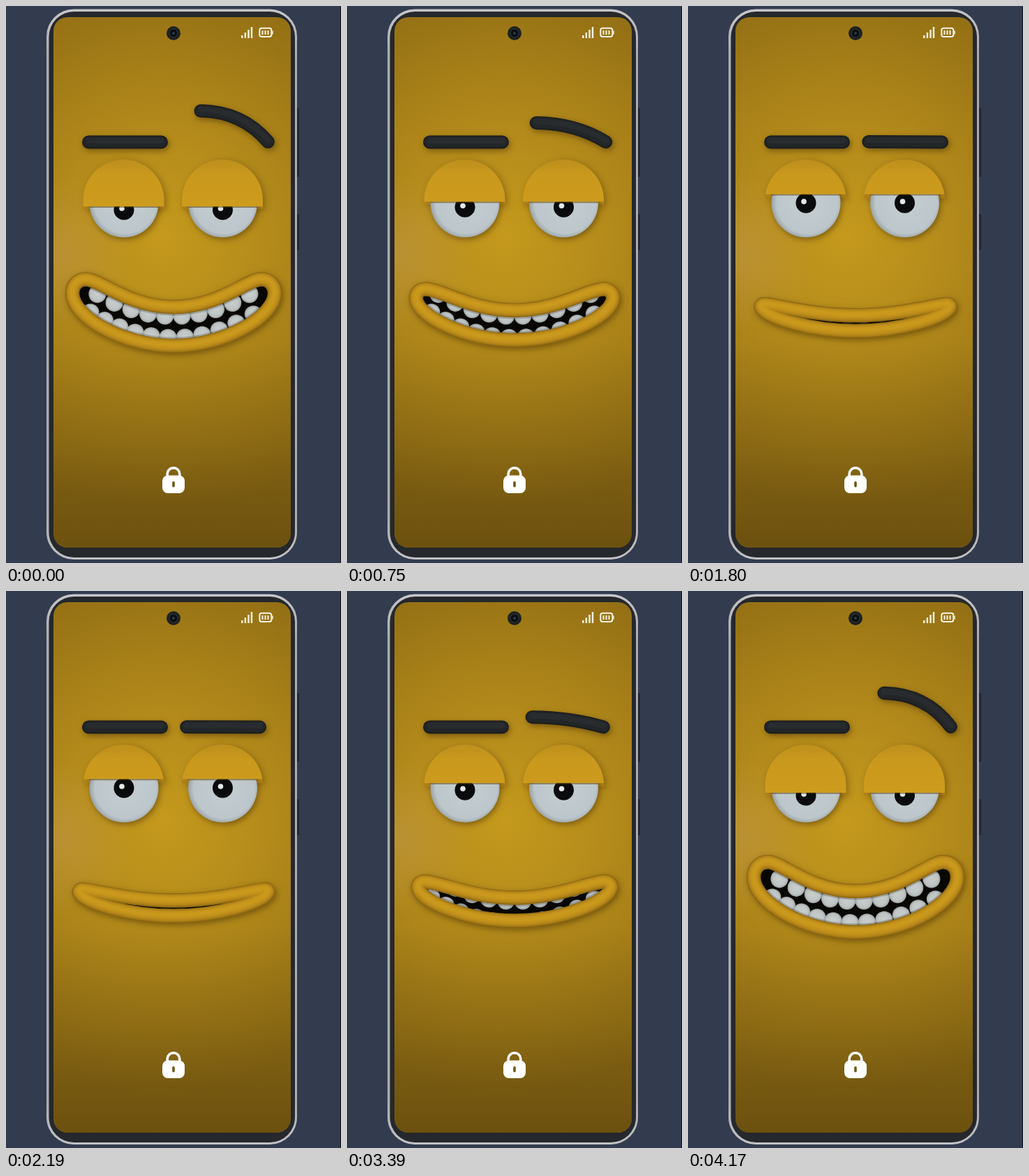
Write an HTML page that moves like this. It is 480 px wide and 798 px high and loops after 4.2 s.

```html
<!DOCTYPE html>
<html lang="en">
<head>
<meta charset="utf-8">
<title>Smirking lock screen</title>
<style>
html, body { margin: 0; width: 100%; height: 100%; overflow: hidden; background: #333b4f; }
svg { display: block; width: 100vw; height: 100vh; }
.cast { filter: drop-shadow(2px 3px 4px rgba(62, 40, 0, .5)); }
.soft { filter: drop-shadow(3px 2px 5px rgba(72, 46, 0, .4)); }
.tube { fill: none; stroke-linecap: round; stroke-linejoin: round; }
</style>
</head>
<body>
<svg viewBox="0 0 480 798">
  <defs>
    <linearGradient id="metal" x2="0" y2="1">
      <stop offset="0" stop-color="#c6c6c9"/>
      <stop offset=".08" stop-color="#ababaf"/>
      <stop offset=".92" stop-color="#ababaf"/>
      <stop offset="1" stop-color="#c2c2c5"/>
    </linearGradient>
    <radialGradient id="wall" gradientUnits="userSpaceOnUse" cx="225" cy="330" r="390">
      <stop offset="0" stop-color="#c4991c"/>
      <stop offset=".3" stop-color="#b88e1c"/>
      <stop offset=".6" stop-color="#a78018"/>
      <stop offset="1" stop-color="#8e6b14"/>
    </radialGradient>
    <radialGradient id="glow" gradientUnits="userSpaceOnUse" cx="72" cy="355" r="110">
      <stop offset="0" stop-color="#c29a50" stop-opacity=".45"/>
      <stop offset="1" stop-color="#c29a50" stop-opacity="0"/>
    </radialGradient>
    <linearGradient id="dusk" gradientUnits="userSpaceOnUse" x1="0" y1="480" x2="0" y2="776">
      <stop offset="0" stop-color="#4a370a" stop-opacity="0"/>
      <stop offset=".5" stop-color="#4a370a" stop-opacity=".18"/>
      <stop offset="1" stop-color="#4a370a" stop-opacity=".5"/>
    </linearGradient>
    <linearGradient id="lid" gradientUnits="userSpaceOnUse" x1="0" y1="220" x2="0" y2="292">
      <stop offset="0" stop-color="#bd8f1c"/>
      <stop offset=".3" stop-color="#c9991d"/>
      <stop offset="1" stop-color="#ce9c1d"/>
    </linearGradient>
    <radialGradient id="ball" cx=".52" cy=".5" r=".52">
      <stop offset="0" stop-color="#c4cdd1"/>
      <stop offset=".85" stop-color="#bdc7cb"/>
      <stop offset="1" stop-color="#9aa2a4"/>
    </radialGradient>
    <radialGradient id="tooth" cx=".5" cy=".5" r=".5">
      <stop offset="0" stop-color="#c9cecd"/>
      <stop offset=".75" stop-color="#bec4c4"/>
      <stop offset="1" stop-color="#9da3a2"/>
    </radialGradient>
    <path id="lips"/>
    <path id="arch"/>
    <clipPath id="hole"><use href="#lips"/></clipPath>
  </defs>

  <rect width="480" height="798" fill="#333b4f"/>
  <rect x="479" width="1" height="798" fill="#10131b"/>
  <rect x="414" y="146" width="6" height="99" rx="2" fill="#22262f"/>
  <rect x="414" y="298" width="6" height="52" rx="2" fill="#22262f"/>
  <rect x="58" y="4.500" width="359" height="788.500" rx="39" fill="url(#metal)"/>
  <rect x="61.500" y="8" width="352.500" height="782" rx="36" fill="#25282c"/>
  <g id="screen"></g>

  <circle cx="240" cy="39" r="10" fill="#1d2122"/>
  <circle cx="240" cy="39" r="6" fill="#0b0f11" stroke="#33383a"/>
  <circle cx="240" cy="39" r="2" fill="#2b3c49"/>

  <g stroke="#f8f3e2" stroke-width="2.400" fill="none">
    <path d="M338.300 46v-4M342.900 46v-8M347.500 46v-12M352 46v-16"/>
    <rect x="363.300" y="31.800" width="17" height="12.200" rx="3" stroke-width="2"/>
    <path d="M367.500 35v6M371.500 35v6M375.500 35v6" stroke-width="2"/>
    <path d="M382 35.500v5" stroke-width="1.500"/>
  </g>

  <g id="face"></g>

  <path d="M231.200 675v-4.500a8.800 8.800 0 0 1 17.600 0v4.500" fill="none" stroke="#fff" stroke-width="3.600"/>
  <rect x="224" y="672.500" width="32" height="25.500" rx="8" fill="#fff"/>
  <rect x="238.200" y="681" width="3.600" height="8.500" rx="1.800" fill="#72560f"/>
</svg>
<script>
const LOOP = 4200, EYES = [168.500, 310];
const byId = id => document.getElementById(id);
const mix = (a, b, k) => a + (b - a) * k;
const clamp = v => Math.max(0, Math.min(1, v));

// A rounded tube: stacked strokes, each [width, colour, vertical shift]
const tube = (ref, layers) => layers.map(([w, c, dy]) =>
  `<use href="#${ref}" class="tube" stroke="${c}" stroke-width="${w}" y="${dy}"/>`).join('');

const browLayers = [[19, '#1d1f20', 0], [15, '#232628', -.5], [8, '#292c2f', -2]];
const lipLayers = [[20.500, '#8d6612', 0], [18, '#a67b16', -.3], [15, '#b78819', -.7], [11, '#c2921b', -1], [6, '#c9991d', -1.500]];

function tooth(x, y, rx, ry) {
  return `<ellipse cx="${x}" cy="${y}" rx="${rx}" ry="${ry}" fill="url(#tooth)"/>`;
}

function teeth() {
  let s = '';
  for (let i = -5; i <= 5; i++) {
    const x = 232 + 24.500 * i + (i < 0 ? .45 * i * i : 0);
    s += tooth(x, 475 - 34 * ((x - 240) / 115) ** 2, 12.600, 12);
  }
  for (let i = 0; i < 10; i++) {
    const x = 131 + 24.200 * i;
    s += tooth(x, 444 - 31 * ((x - 240) / 108) ** 2, 12.600, 13);
  }
  return s;
}

const eye = (cx, i) => `
  <g class="soft"><path id="back${i}" fill="#b08118"/></g>
  <g class="cast"><circle cx="${cx + .5}" cy="282" r="49.500" fill="url(#ball)"/></g>
  <g id="pupil${i}">
    <circle cx="${cx + .5}" r="14.500" fill="#0a0b0c"/>
    <circle cx="${cx - 2.500}" cy="-2" r="3.800" fill="#e4e8e9"/>
  </g>
  <path id="shade${i}" fill="none" stroke="#4a3508" stroke-opacity=".5" stroke-width="2.500"/>
  <path id="lid${i}" fill="url(#lid)"/>`;

byId('screen').innerHTML = ['wall', 'glow', 'dusk'].map(fill =>
  `<rect x="68" y="16" width="340" height="760" rx="20" fill="url(#${fill})"/>`).join('');

byId('face').innerHTML = `
  <defs><path id="flat" d="M118.500 195H222.500"/></defs>
  <g class="cast">${tube('flat', browLayers)}</g>
  <g class="cast">${tube('arch', browLayers)}</g>
  ${EYES.map(eye).join('')}
  <g class="cast">
    <use href="#lips" fill="#090704"/>
    <g clip-path="url(#hole)">
      <g id="teeth">${teeth()}</g>
      <use href="#lips" class="tube" stroke="#000" stroke-opacity=".2" stroke-width="25"/>
    </g>
    ${tube('lips', lipLayers)}
  </g>`;

const ease = u => u <= 0 ? 0 : 1 - Math.exp(-((u / 265) ** 1.350));

// Smile amount: the end of a rise, a fall, a rest, then a new rise
function smile(t) {
  if (t < 570) return ease(t + 510);
  if (t < 3270) return 1 - .965 * ease(t - 570) - .035 * clamp((t - 570) / 1900);
  return ease(t - 3270);
}

function dome(cx, base) {
  const r = 58, cy = 278;
  const h = base < cy ? Math.sqrt(r * r - (cy - base) ** 2) : r;
  const y = Math.min(base, cy);
  return `M${cx - h} ${base}V${y}A${r} ${r} 0 0 1 ${cx + h} ${y}V${base}Z`;
}

// Left half as points; the right half mirrors it around x = 240
function mouth(k) {
  const p = (x0, y0, x1, y1) => [mix(x0, x1, k), mix(y0, y1, k)];
  const left = [
    p(240, 465.500, 240, 489), p(175, 465.500, 165, 489), p(112, 446, 94, 445),
    p(105, 432, 94, 410), p(104, 429, 94, 397), p(107, 427, 102, 388),
    p(112, 428, 115, 388), p(140, 432, 135, 388), p(185, 443.500, 175, 430),
    p(240, 443.500, 240, 430)
  ];
  const right = left.slice(0, -1).reverse().map(([x, y]) => [480 - x, y]);
  const [start, ...rest] = [...left, ...right];
  return `M${start}C${rest.join(' ')}Z`;
}

function draw(k) {
  const base = mix(269.500, 289, k);
  EYES.forEach((cx, i) => {
    byId('back' + i).setAttribute('d', dome(cx, base + mix(6, 3.500, k)));
    byId('lid' + i).setAttribute('d', dome(cx, base));
    byId('shade' + i).setAttribute('d', `M${cx - 49} ${base + .5}h99`);
    byId('pupil' + i).setAttribute('transform', `translate(0 ${mix(282, 293, k)})`);
  });
  const q = (a, b) => mix(a, b, k);
  byId('arch').setAttribute('d',
    `M${q(258.500, 281)} ${q(195, 146)}Q${q(311, 341)} ${q(195, 147)} ${q(363.500, 376.500)} ${q(195, 194.500)}`);
  byId('lips').setAttribute('d', mouth(k));
  byId('teeth').setAttribute('opacity', clamp(.1 + k * 3));
}

function frame() {
  draw(smile(performance.now() % LOOP));
  requestAnimationFrame(frame);
}
frame();
</script>
</body>
</html>
```
